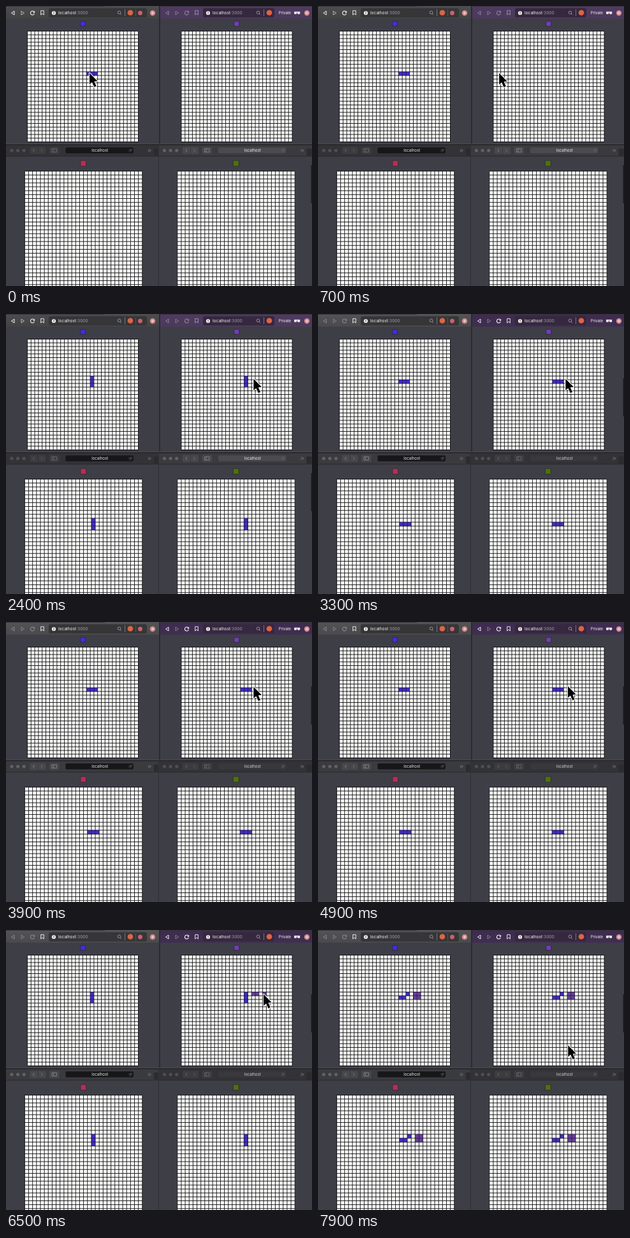
An HTML page with a canvas for the animation above (8000 ms loop, 480 by 440 pixels).

```html
<!DOCTYPE html>
<html lang="en">
<head>
<meta charset="utf-8">
<title>Shared Game of Life</title>
<style>
  html, body { margin: 0; width: 100%; height: 100%; overflow: hidden; background: #3e3e47; }
  canvas { display: block; width: 480px; height: 440px; }
</style>
</head>
<body>
<canvas id="stage" width="480" height="440"></canvas>
<script>
const c = document.getElementById('stage').getContext('2d');
const LOOP = 8000, FIRST_TICK = 1100, TICK = 2100, FOCUS = 2900, SIZE = 30;
const BLUE = '#402cc4', PURPLE = '#673d9f';
const FONT = 'Inter, "Liberation Sans", sans-serif';

// Cells painted by hand in the private window: time, column, row
const strokes = [[6000, 19, 10], [6200, 20, 10], [6400, 22, 10], [6700, 21, 11]];

// Pointer stops: time, x, y
const path = [
  [0, 131, 105.3], [200, 132, 105], [1100, 392.3, 106], [1900, 392.3, 106],
  [2400, 388.4, 102], [3900, 388.4, 102], [4700, 392, 101], [5800, 392, 101],
  [6000, 388.4, 101], [6200, 394, 101], [6400, 404, 101], [6500, 404, 101],
  [6700, 400, 106], [7000, 402, 103], [7400, 402, 103], [7800, 392.3, 181.3], [8000, 392.3, 181.3]
];

const windows = [
  { grid: [33.5, 39.5, 174], dot: [116.7, 24.2, 7.6, '#432fd8'] },
  { grid: [275, 39.5, 174], dot: [358, 24.2, 7.6, '#713eb4'] },
  { grid: [29.4, 259.5, 184.4], dot: [117, 243, 8.6, '#b82c58'] },
  { grid: [268.8, 259.5, 184.4], dot: [356.6, 243, 8.6, '#50700f'] }
];

function nextGeneration(cells) {
  const near = new Map(), next = new Map();
  for (const [key, color] of cells) {
    const [x, y] = key.split(',').map(Number);
    for (let dx = -1; dx <= 1; dx++)
      for (let dy = -1; dy <= 1; dy++) {
        if (!dx && !dy) continue;
        const k = `${x + dx},${y + dy}`;
        near.set(k, [...(near.get(k) || []), color]);
      }
  }
  for (const [key, colors] of near) {
    if (colors.length === 3 || (colors.length === 2 && cells.has(key)))
      next.set(key, cells.get(key) || colors.sort()[1]);
  }
  return next;
}

const generations = [new Map([16, 17, 18].map(x => [`${x},11`, BLUE]))];
for (let i = 1; i < 5; i++) {
  const parent = new Map(generations[i - 1]);
  if (i === 4) for (const [, x, y] of strokes) parent.set(`${x},${y}`, PURPLE);
  generations.push(nextGeneration(parent));
}

function rect(x, y, w, h, color, r = 0) {
  c.fillStyle = color;
  c.beginPath();
  c.roundRect(x, y, w, h, r);
  c.fill();
}

function circle(x, y, r, color) {
  c.fillStyle = color;
  c.beginPath();
  c.arc(x, y, r, 0, 7);
  c.fill();
}

function line(points, color, width = 1, close = false) {
  c.strokeStyle = color;
  c.lineWidth = width;
  c.beginPath();
  points.forEach(([x, y]) => c.lineTo(x, y));
  if (close) c.closePath();
  c.stroke();
}

// Returns the x where the text ends
function text(str, x, y, size, color, align = 'left') {
  c.font = `${size}px ${FONT}`;
  c.textAlign = align;
  c.fillStyle = color;
  c.fillText(str, x, y);
  return x + c.measureText(str).width;
}

function reload(x, y, r, color) {
  c.strokeStyle = color;
  c.lineWidth = r > 2 ? 1.1 : 0.7;
  c.beginPath();
  c.arc(x, y, r, 0.3, 5.5);
  c.stroke();
  c.fillStyle = color;
  c.beginPath();
  c.moveTo(x + r + 0.6, y - r - 0.4);
  c.lineTo(x + r + 0.6, y - 0.2);
  c.lineTo(x + r - 2.3, y - 0.2);
  c.fill();
}

function topBar(x, active, isPrivate) {
  const icon = active ? '#f2f2f2' : '#8b878f';
  const fade = c.createLinearGradient(0, 0, 0, 20);
  const shades = isPrivate
    ? (active ? ['#3f2a50', '#402f50'] : ['#513964', '#4b3a5a'])
    : (active ? ['#4d4d4f', '#434345'] : ['#545456', '#4a4a4c']);
  shades.forEach((s, i) => fade.addColorStop(i, s));
  rect(x, 0, 240, 20, fade);
  rect(x, 0, isPrivate ? 240 : 155, 1, '#35343a');
  rect(x + 67, 3.5, isPrivate ? 112 : 154, 14.5, isPrivate ? '#36283f' : '#363639', 3);

  line([[x + 13, 8], [x + 8.5, 11], [x + 13, 14]], icon, 1, true);
  line([[x + 24, 8], [x + 28.5, 11], [x + 24, 14]], active && !isPrivate ? '#b8b8b8' : '#85808a', 1, true);
  reload(x + 41.5, 11, 3, icon);
  line([[x + 54.7, 7.3], [x + 59.3, 7.3], [x + 59.3, 14], [x + 57, 11.8], [x + 54.7, 14]],
    !isPrivate || active ? '#e8e8e8' : '#9c94a4', 1, true);

  circle(x + 75, 11, 3.1, '#f4f4f4');
  rect(x + 74.5, 9, 1, 2.5, '#38383b');
  rect(x + 74.5, 12.1, 1, 1, '#38383b');
  const hostEnd = text('localhost', x + 82, 13.3, 6.6, '#f4f4f4');
  text(':3000', hostEnd, 13.3, 6.6, '#a09da5');

  const end = isPrivate ? 153.5 : 177.5;
  c.strokeStyle = '#aaa8ad';
  c.lineWidth = 0.8;
  c.beginPath();
  c.arc(x + end, 10.2, 2.3, 0, 7);
  c.stroke();
  line([[x + end + 1.7, 12], [x + end + 3.5, 13.8]], '#aaa8ad', 0.9);
  rect(x + end + 8.5, 5, 0.8, 11, '#85818a');
  circle(x + end + 17.5, 10.5, 4.3, '#dd6543');
  if (isPrivate) {
    text('Private', 427.7, 13.1, 5.9, '#f2f2f2');
    rect(452, 9, 4.2, 3.8, '#f2f2f2', 1.6);
    rect(457, 9, 4.2, 3.8, '#f2f2f2', 1.6);
    rect(452, 8.8, 9.2, 1.1, '#f2f2f2');
  } else {
    rect(x + 203, 5, 0.8, 11, '#58575c');
    circle(210.5, 11, 3.4, '#c9626c');
  }
  circle(x + 230, 11, 4.2, '#d38f91');
  circle(x + 230, 11, 1.8, '#ead0d0');
}

function bottomBar(x, early, left) {
  const dim = left === early;
  const icon = dim ? '#6e6e73' : '#88888d';
  const button = dim ? '#3d3d40' : '#48484c';
  rect(x, 219, 241, 17, dim ? '#333337' : '#3b3b3f');
  rect(x, 235.5, 241, 1, '#29292d');
  for (let i = 0; i < 3; i++) circle(x + 9 + i * 9.6, 227, 2.6, dim ? '#505054' : '#626266');

  rect(x + 37.5, 221.5, 25, 11, button, 2);
  rect(x + 49.7, 222, 0.7, 10, '#343438');
  line([[x + 44.5, 224.6], [x + 42.3, 227], [x + 44.5, 229.4]], icon, 0.9);
  line([[x + 55, 224.6], [x + 57.2, 227], [x + 55, 229.4]], dim ? '#5a5a5f' : '#717176', 0.9);
  rect(x + 68, 221.5, 15.5, 11, button, 2);
  line([[x + 72, 224.4], [x + 79.5, 224.4], [x + 79.5, 229.6], [x + 72, 229.6]], icon, 0.8, true);
  line([[x + 74.4, 224.4], [x + 74.4, 229.6]], icon, 0.8);

  const field = left ? '#17171a' : early ? '#4b4b4f' : '#39393d';
  rect(x + 93.5, 222.3, 106.5, 9.2, field, 2);
  text('localhost', x + 147.2, 229.2, 6.1, left || early ? '#ededee' : '#d0d0d2', 'center');
  reload(x + 195, 227, 1.9, '#68686d');
  for (const dx of [222.8, 225.4])
    line([[x + dx, 224.8], [x + dx + 2, 227], [x + dx, 229.2]], '#88888d', 0.8);
  rect(x + 232, 224, 8, 11.5, '#2c2c30');
}

function board([x, y, width], cells) {
  const s = width / SIZE;
  const paint = () => {
    for (const [key, color] of cells) {
      const [col, row] = key.split(',');
      rect(x + col * s, y + row * s, s, s, color);
    }
  };
  rect(x, y, width, width, '#fdfdfb');
  paint();
  c.strokeStyle = 'rgba(12,12,14,.9)';
  c.lineWidth = 1;
  c.beginPath();
  for (let i = 0; i <= SIZE; i++) {
    c.moveTo(x + i * s, y);
    c.lineTo(x + i * s, y + width);
    c.moveTo(x, y + i * s);
    c.lineTo(x + width, y + i * s);
  }
  c.stroke();
  // Soften the seams inside painted cells
  c.globalAlpha = 0.35;
  paint();
  c.globalAlpha = 1;
}

function pointer(t) {
  const i = path.findIndex((p, n) => n && t <= p[0]);
  const [t0, x0, y0] = path[i - 1], [t1, x1, y1] = path[i];
  const k = (t - t0) / (t1 - t0), e = k * k * (3 - 2 * k);
  c.save();
  c.translate(x0 + (x1 - x0) * e, y0 + (y1 - y0) * e);
  c.scale(0.9, 0.9);
  c.beginPath();
  [[0, 0], [0, 20], [4.4, 16], [8.2, 24.5], [11.8, 23], [8.2, 14.7], [14, 14.3]]
    .forEach(([x, y]) => c.lineTo(x, y));
  c.closePath();
  c.lineJoin = 'round';
  c.strokeStyle = '#f4f4f4';
  c.lineWidth = 2.4;
  c.stroke();
  c.fillStyle = '#000';
  c.fill();
  c.restore();
}

function draw(t) {
  const early = t < FOCUS;
  const generation = Math.max(0, Math.floor((t - FIRST_TICK) / TICK) + 1);
  rect(0, 0, 480, 440, '#3e3e47');
  topBar(0, early, false);
  topBar(242, !early, true);
  rect(240, 0, 2, 218, '#2c2b31');
  rect(0, 216.5, 480, 2.5, '#29292e');
  rect(0, 216, 480, 0.8, '#55555c');
  bottomBar(0, early, true);
  bottomBar(239.5, early, false);
  rect(238.8, 219, 1.2, 221, '#303036');
  rect(478.7, early ? 250 : 101, 1.3, 60, '#17171b');

  windows.forEach((w, i) => {
    // Hand-painted cells stay local until the next shared tick
    const cells = new Map(generation || i === 0 ? generations[generation] : []);
    if (i === 1 && generation === 3)
      for (const [at, x, y] of strokes) if (t >= at) cells.set(`${x},${y}`, PURPLE);
    board(w.grid, cells);
    const [x, y, size, color] = w.dot;
    rect(x, y, size, size, color);
    c.strokeStyle = 'rgba(20,20,24,.6)';
    c.lineWidth = 0.7;
    c.strokeRect(x, y, size, size);
  });
  pointer(t);
}

const start = performance.now();
function frame() {
  draw((performance.now() - start) % LOOP);
  requestAnimationFrame(frame);
}
frame();
</script>
</body>
</html>
```
